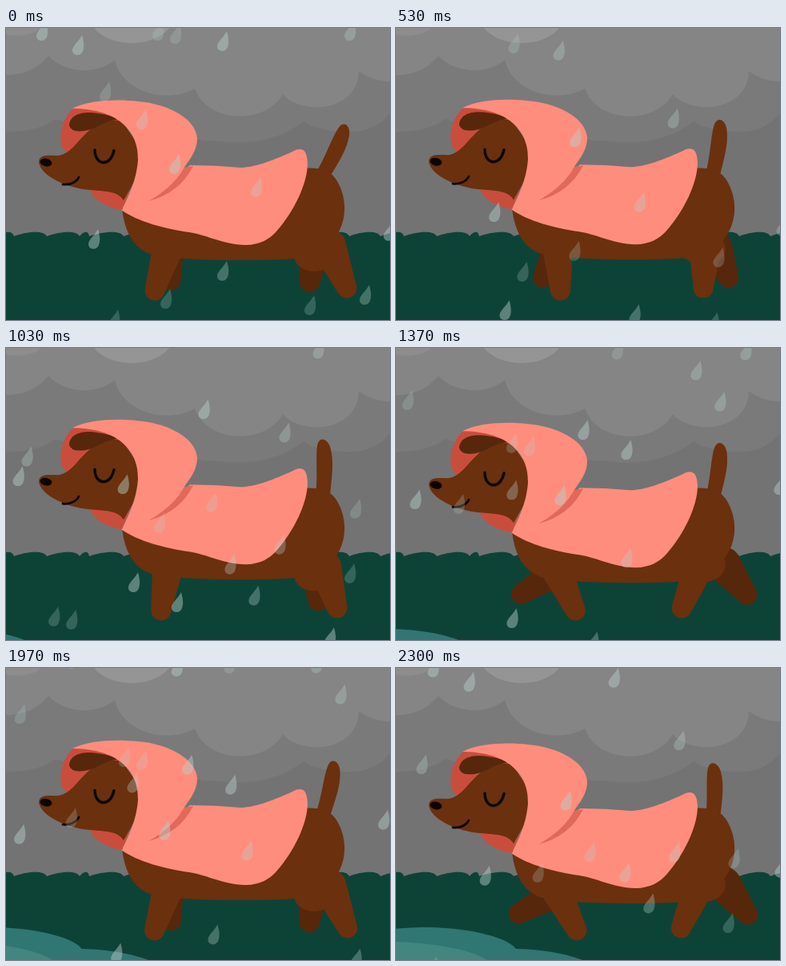
These frames come from a looping animation (480 by 366 pixels, 2.33 s). An HTML page with a canvas:

```html
<!DOCTYPE html>
<html>
<head>
<meta charset="utf-8">
<title>Walk in the rain</title>
<style>
html, body { margin: 0; width: 100%; height: 100%; overflow: hidden; background: #737373; }
canvas { display: block; }
</style>
</head>
<body>
<canvas id="stage" width="480" height="366"></canvas>
<script>
const ctx = document.getElementById('stage').getContext('2d');
const LOOP = 2330, FRAMES = 70, STRIDE = 0.985;
const BROWN = '#6b300e', DARK = '#57270c', PINK = '#ff8d7d', RED = '#c94d3d';
const wave = x => Math.cos(2 * Math.PI * x);

const fill = (color, path) => {
  ctx.fillStyle = color;
  ctx.fill(new Path2D(path));
};
const stroke = (width, path) => {
  ctx.strokeStyle = '#0b0504';
  ctx.lineWidth = width;
  ctx.lineCap = 'round';
  ctx.stroke(new Path2D(path));
};
const ellipse = (color, x, y, rx, ry, turn = 0) => {
  ctx.fillStyle = color;
  ctx.beginPath();
  ctx.ellipse(x, y, rx, ry, turn, 0, 7);
  ctx.fill();
};
const shifted = (x, y, draw) => {
  ctx.save();
  ctx.translate(x, y);
  draw();
  ctx.restore();
};

function drawSky() {
  fill('#737373', 'M0 0H480V366H0Z');
  fill('#7a7a7a', 'M0 0H480V106Q463 130 430 130Q395 131 372 117Q330 150 265 142Q200 140 165 112Q105 130 62 114Q38 131 0 130Z');
  fill('#858585', 'M0 0H480V67Q458 67 441 54C440 105 370 110 346 83C324 122 252 120 236 76C200 96 145 80 136 40C115 58 75 58 53 35Q33 59 0 59Z');
  ellipse('#959595', 157, -22, 56, 41);
  ellipse('#8d8d8d', 14, -22, 42, 32);
}

function drawGround(t) {
  const notches = [-12, 10, 51, 92, 104, 147, 190, 232, 275, 318, 360, 395, 429, 468, 505];
  let path = 'M-12 366V261';
  notches.slice(1).forEach((x, i) => {
    const w = x - notches[i];
    path += `C${x - w * 0.7} 256 ${x - w * 0.1} 252 ${x} 261`;
  });
  fill('#0d4337', path + 'V366Z');
  shifted((t - 2.3) * 166, 0, () => {
    fill('#307673', 'M-130 368C-110 345 -40 325 40 325C100 326 142 340 150 352C190 353 220 360 238 368Z');
    fill('#43857f', 'M-100 368C-80 345 -20 342 0 343C50 345 100 354 116 368Z');
  });
}

// Tapered leg: the hull of a hip circle and a smaller foot circle.
function leg(color, hx, hy, hipR, x, y) {
  const footR = 12.5;
  const dir = Math.atan2(y - hy, x - hx);
  const spread = Math.acos((hipR - footR) / Math.hypot(x - hx, y - hy));
  ctx.fillStyle = color;
  ctx.beginPath();
  ctx.arc(hx, hy, hipR, dir + spread, dir - spread + 2 * Math.PI);
  ctx.arc(x, y, footR, dir - spread, dir + spread);
  ctx.fill();
}

function hindLeg(color, x, y) {
  const reach = x - 398;
  leg(color, 392 + reach * 0.42, 277 - reach * 0.14, 20 + reach * 0.05, x, y);
}

function drawHead() {
  fill(RED, 'M84 101C73 111 66 128 69 145Q70 153 80 158L150 150L146 116Q115 96 84 101Z');
  fill(RED, 'M104 202Q114 223 145 228L161 188Z');
  fill(BROWN, 'M41 168C42 158 52 160 65 160C86 157 92 132 118 119Q132 113 145 117L168 150L163 188L147 216C140 205 128 205 105 203C78 201 43 186 41 168Z');
  fill(DARK, 'M79 122C80 107 98 104 115 107Q132 109 141 115C122 115 116 126 98 129Q81 131 79 122Z');
  fill(PINK, `M83 101C104 90 140 89 165 92C202 95 237 113 239 138C239 154 230 164 222 176
    C210 198 185 218 145 228C152 212 163 193 165 165C166 132 143 101 83 101Z`);
  ellipse('#0b0504', 50, 168.5, 7.5, 4.8, 0.2);
  stroke(3.4, 'M111 153C111 163 116 168.500 122 168.500C129 168 133 162 135 153.500');
  stroke(2.8, 'M71 196C80 197 88 193 91 187');
}

function drawDog(t) {
  const step = t / STRIDE;
  const bob = 1.5 - 2.5 * wave(2 * step - 0.15);
  const nearFront = 199 + 27 * wave(step - 0.33);
  const farSwing = wave(step - 0.82);
  const nearHind = 400 + 44 * wave(step - 0.85);
  const farHind = 402 + 38 * wave(step - 0.35);

  leg(DARK, 203, 276 + bob, 19, 190 + 37 * farSwing, 314 + 6 * farSwing);
  hindLeg(DARK, farHind, 320 - (farHind - 372) * 0.16);

  shifted(397, 184 + bob, () => {
    ctx.rotate((13 + 12.5 * wave(t / 0.417 - 0.97)) * Math.PI / 180);
    fill(BROWN, 'M-10 2C-7 -22 -11 -50 -8 -63C-5 -73 5 -69 8 -58C13 -40 10 -22 8 2Z');
  });

  shifted(0, bob, () => fill(BROWN, `M145 226C148 255 160 282 192 286Q225 291 300 291
    Q345 291 372 288L400 270L370 200L240 200Z`));
  fill(BROWN, 'M365 176C392 174 405 177 414 192C426 213 426 238 415 257C404 276 388 290 362 290L330 250Z');
  const lift = Math.min(1, (nearHind - 356) / 60);
  ellipse(BROWN, 386, 272 + 12 * lift, 26, 21, -0.1);
  hindLeg(BROWN, nearHind, 326);
  leg(BROWN, 202, 277 + bob, 19, nearFront, 329);

  shifted(0, bob, () => {
    fill(PINK, `M144 228C165 243 200 252 229 256C250 259 270 271 299 272
      C318 272 330 264 338 255C360 230 377 195 377 169C376 153 371 150 362 153
      C335 166 310 175 293 175Q262 172 230 172L180 210Z`);
    fill('#e0695b', 'M234 173L221 175Q207 201 178 217Q217 207 234 173Z');
    drawHead();
  });
}

// Starting points of the drops, as x, y pairs.
const DROPS = [90,22, 124,80, 170,115, 211,171, 212,8, 313,200, 110,265, 200,340, 271,305,
  271,17, 380,348, 449,335, 479,255, 135,366, 430,4, 45,4, 190,4, 462,-60, 354,-40,
  60,-50, 400,-35, 300,-65];

function drawRain(frame) {
  for (let i = 0; i < DROPS.length; i += 2) {
    const cycle = 15 + (i / 2) % 3;
    const top = DROPS[i + 1] + 80;
    const y = (top + 26.2 * frame) % (26.2 * cycle + 60) - 80;
    const fallen = y - DROPS[i + 1];
    const x = ((DROPS[i] - fallen * 0.39) % 500 + 500) % 500;
    const alpha = [0.46, 0.24, 0.33][(i / 2) % 3];
    shifted(x, y, () => fill(`rgba(184,208,203,${alpha})`,
      'M5 -13C8 -3 8 4 5 9C1 14 -7 12 -7 6C-7 0 1 -5 5 -13Z'));
  }
}

function draw(now) {
  const frame = Math.floor(((now % LOOP) + 5) / LOOP * FRAMES) % FRAMES;
  const t = frame / 30;
  drawSky();
  drawGround(t);
  drawDog(t);
  drawRain(frame);
  requestAnimationFrame(() => draw(performance.now()));
}
draw(0);
</script>
</body>
</html>
```
